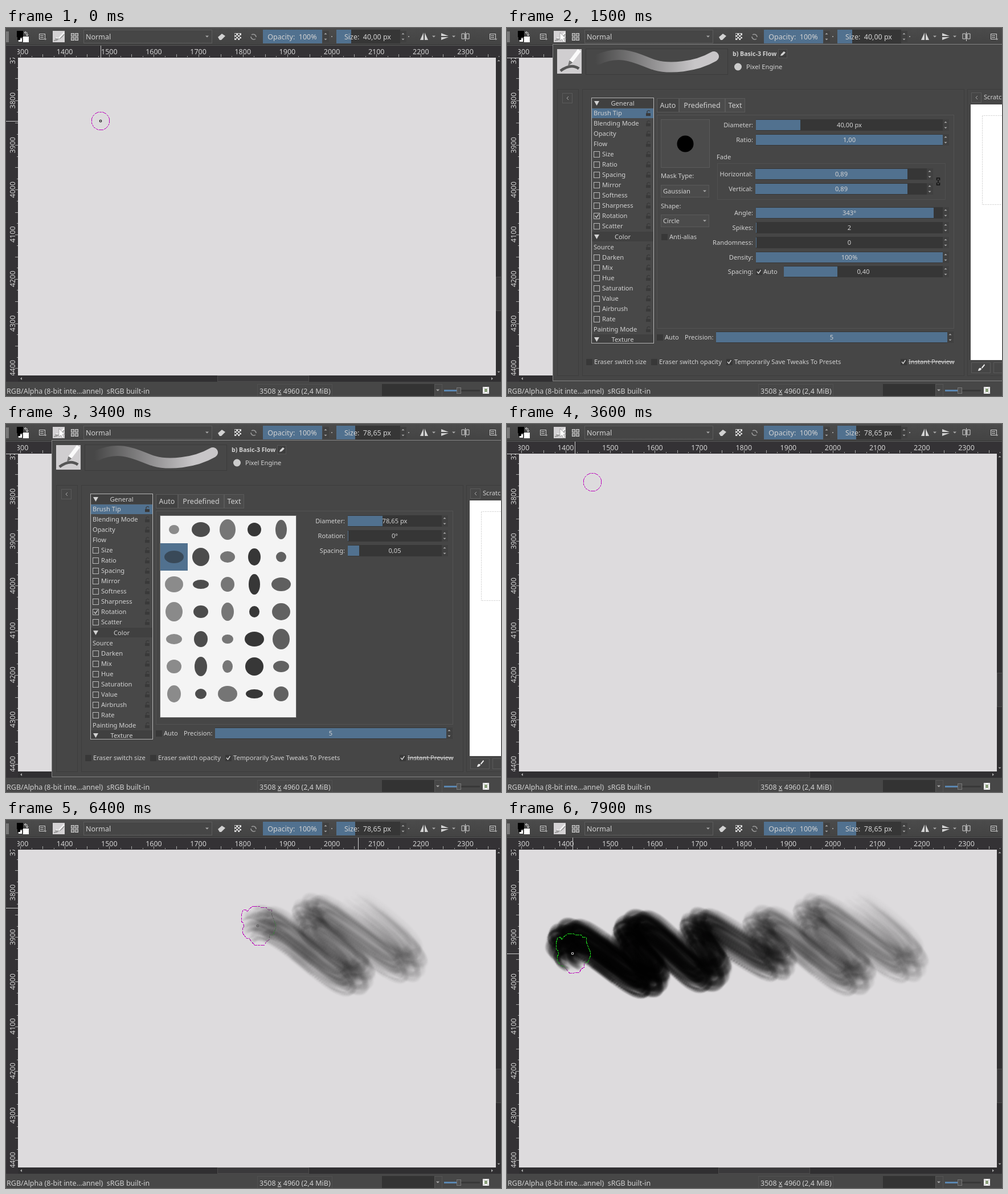
An HTML page with a canvas for the animation above (8 s loop, 869 by 645 pixels).

```html
<!DOCTYPE html>
<html lang="en">
<head>
<meta charset="utf-8">
<title>Brush tip demo</title>
<style>
html, body { margin: 0; width: 100%; height: 100%; overflow: hidden; background: #464646; }
#stage { position: relative; width: 869px; height: 645px; overflow: hidden; isolation: isolate; }
#stage > * { position: absolute; left: 0; top: 0; }
text { font-family: "Noto Sans", "Open Sans", sans-serif; white-space: pre; }
#ring { mix-blend-mode: difference; }
</style>
</head>
<body>
<div id="stage">
  <svg id="ui" width="869" height="645"></svg>
  <canvas id="paint" width="869" height="645"></canvas>
  <svg id="ring" width="869" height="645" fill="none">
    <g id="outline">
      <circle id="round" r="15.8" stroke="#22dd22" stroke-dasharray="4 .8" shape-rendering="crispEdges"/>
      <path id="blob" stroke="#22dd22" stroke-dasharray="7 1 4 1.5" shape-rendering="crispEdges" transform="translate(-2 -1.500)"
        d="M-6-33L4-33 7-31 17-31 20-27 26-27 27-17 30-9 33-2 33 7 29 17 22 18 22 26 17 29 14 35-3 36-9 29-13 24-18 23-25 14-25 6-22 3-24-4-27-6-27-17-24-26-19-27-17-23-12-29z"/>
      <circle id="dot" r="1.8" stroke="#dddbdd" stroke-width="1.1"/>
    </g>
  </svg>
  <svg id="top" width="869" height="645">
    <path id="pointer" d="M0 0V14.500L3.500 11.500 6 17 8.600 15.800 6.200 10.500H10.500z" fill="#fff" stroke="#8a8a8a" stroke-width=".7"/>
  </svg>
</div>
<script>
const $ = id => document.getElementById(id);
const BLUE = '#51718f', DARK = '#363636', INK = '#d2d2d2', BIG = 12.5, SMALL = 11.15;

// Markup helpers
const rect = (x, y, w, h, fill, more = '') => `<rect x="${x}" y="${y}" width="${w}" height="${h}" fill="${fill}" ${more}/>`;
const box = (x, y, w, h, line = '#555', fill = 'none') => rect(x + .5, y + .5, w - 1, h - 1, fill, `stroke="${line}"`);
const path = (d, fill = INK, line = 'none', w = 1) => `<path d="${d}" fill="${fill}" stroke="${line}" stroke-width="${w}"/>`;
const text = (x, y, s, size = SMALL, anchor = 'start', more = '') =>
  `<text x="${x}" y="${Math.round(y + size * .36)}" font-size="${size}" text-anchor="${anchor}" fill="${INK}" ${more}>${s}</text>`;
const down = (x, y, r = 3) => path(`M${x - r} ${y - r / 2}h${2 * r}l${-r} ${r}z`, '#aaa');
const up = (x, y, r = 3) => path(`M${x - r} ${y + r / 2}h${2 * r}l${-r} ${-r}z`, '#aaa');
const spin = (x, y) => rect(x - 5, y - 10, 11, 20, '#404040') + up(x, y - 5, 2.5) + down(x, y + 5, 2.5);
const check = (x, y, on) => rect(x - 5, y - 5, 11, 11, '#383838') +
  (on ? path(`M${x - 3} ${y}l2.500 3 4-6`, 'none', INK, 1.4) : '');
const combo = (x, y, w, s) => box(x, y - 11, w, 22, '#5a5a5a', '#4b4b4b') + text(x + 4, y, s) + down(x + w - 8, y);
const slider = (x, y, end, fillEnd, s, spinX) => rect(x, y - 10, end - x, 20, DARK) +
  rect(x, y - 9, Math.max(1, fillEnd - x), 18, BLUE) + text((x + end) / 2, y, s, SMALL, 'middle') + spin(spinX, y);
const row = (label, y, fillEnd, s) => text(432, y, label, SMALL, 'end') + slider(437, y, 765, fillEnd, s, 770);

function windowIcon(x, y) {
  return box(x - 6, y - 5, 11, 10, INK) + rect(x - 4, y - 2, 6, 1, INK) + rect(x - 4, y + 1, 6, 1, INK) + down(x + 5, y + 5, 2.5);
}

function toolbar() {
  let s = rect(0, 0, 869, 30, 'url(#bar)') + rect(0, 29, 869, 1, '#333') + rect(0, 30, 869, 1, '#5b5b5b') + rect(0, 6, 5, 19, '#777');
  s += rect(30, 15, 10, 10, '#fff') + rect(19, 5, 11, 11, '#000') + rect(22, 18, 6, 6, '#fff') + rect(20, 16, 5, 5, '#000');
  s += path('M33 8h4v5M35 6l-3 2 3 2M35 11l2 3 2-3', 'none', INK);
  s += windowIcon(64, 15) + rect(82, 5, 21, 20, '#d4d2d4');
  s += path('M84 22Q95 21 102 11', 'none', '#8f8f8f', 1.5) + path('M88 17l4 2 10-11', 'none', '#f4f4f4', 2.5) + path('M86 19h7', 'none', '#777');
  for (const x of [115, 122]) for (const y of [9, 16]) s += box(x - 1, y, 6, 6, INK, '#777');
  s += box(136, 3, 226, 24, '#5c5c5c', '#464646') + text(140, 15, 'Normal', BIG) + down(353, 15);
  s += path('M372 16l7-6 6 4-7 7h-3z') + rect(401, 9, 12, 12, INK);
  for (let i = 0; i < 8; i++) s += rect(402 + i % 4 * 3 - .5, 10 + (i % 2) * 3 + (i > 3) * 5.500, 2.500, 2.500, '#333');
  s += path('M431 12a5 5 0 0 1 8 4M438 19a5 5 0 0 1-8-4', 'none', '#999', 1.5);
  s += rect(451, 3, 104, 24, BLUE) + text(502.5, 15, 'Opacity:  100%', BIG, 'middle') + spin(561, 15) + rect(571, 14, 2, 2, '#999');
  s += rect(580, 3, 112, 24, DARK) + `<rect id="sizeFill" x="580" y="3" height="24" fill="${BLUE}"/>`;
  s += text(594, 15, 'Size:', BIG) + text(676, 15, '', BIG, 'end', 'id="sizeText"') + spin(697, 15) + rect(706, 14, 2, 2, '#999');
  s += path('M733 8v13h-6zM735 8v13h6z') + down(751, 15) + path('M764 9v5h13zM764 21v-5h13z') + down(786, 15);
  s += path('M800 10h5v9h-5zM808 10h5v9h-5zM806.500 7v16', 'none', INK) + windowIcon(855, 15);
  return s;
}

function thumb(x, y, n) {
  return `<svg x="${x}" y="${y}" width="${n}" height="${n}" viewBox="0 0 44 44">` + rect(0, 0, 44, 44, '#d0ced0') +
    path('M6 39Q25 25 39 35', 'none', '#555', 5) + path('M40 2L24 23', 'none', '#fafafa', 7) +
    path('M22 20l6 4-9 7z', '#777') + '</svg>';
}

function rulers() {
  const step = 78.15;
  let s = rect(0, 31, 869, 21, '#343235') + rect(0, 52, 21, 568, '#343235');
  let h = '', v = '';
  for (let i = 0; i < 45; i++) {
    const x = Math.round(25 + i * step / 4), y = Math.round(49 + i * step / 4);
    const len = i % 4 == 0 ? 5 : i % 2 ? 2 : 5;
    if (x > 21) h += rect(x, 51 - len, 1, len, '#aaa');
    if (y > 52 && y < 609) v += rect(21 - len, y, len, 1, '#aaa');
    if (i % 4) continue;
    h += text(25 + i / 4 * step, 41, 1300 + 25 * i, BIG, 'middle');
    if (i < 32) v += text(0, 0, 3700 + 25 * i, BIG, 'middle', `transform="translate(11 ${49 + i / 4 * step}) rotate(-90)"`);
  }
  return s + `<g clip-path="url(#hclip)">${h}</g><g clip-path="url(#vclip)">${v}</g>` +
    rect(0, 31, 1, 21, '#ccc', 'id="markX"') + rect(0, 0, 21, 1, '#ccc', 'id="markY"');
}

function frame() {
  let s = rect(21, 52, 839, 557, '#dddbdd');
  s += rect(860, 52, 9, 568, '#302f31') + box(860, 436, 10, 60, '#4c4c4c', '#3a393b') + up(865, 57, 2.5) + down(865, 603, 2.5);
  s += rect(21, 609, 839, 11, '#302f31') + box(371, 609, 161, 11, '#4c4c4c', '#3a393b');
  s += path('M28 612v5l-3-2.500zM852 612v5l3-2.500z', '#aaa');
  s += rect(0, 620, 869, 25, '#474747') + text(1, 636, 'RGB/Alpha (8-bit inte...annel)  sRGB built-in', BIG);
  s += box(441, 624, 132, 22, '#505050') + text(445, 636, '3508 <tspan text-decoration="underline">x</tspan> 4960 (2,4 MiB)', BIG);
  s += rect(660, 624, 92, 21, '#333') + box(752, 624, 14, 22, '#555') + down(758, 635);
  s += rect(769, 634, 25, 3, '#5b86b0') + rect(799, 634, 33, 3, '#383838') + box(791, 630, 8, 11, '#777', '#505050');
  s += rect(837, 629, 11, 12, '#f2f2f2') + rect(840, 632, 5, 6, '#8aa07a') + path('M838 630l3 3M847 630l-3 3M838 640l3-3M847 640l-3-3', 'none', '#aaa');
  return s;
}

const OPTIONS = '#General,Brush Tip,Blending Mode,Opacity,Flow,+Size,+Ratio,+Spacing,+Mirror,+Softness,+Sharpness,!Rotation,+Scatter,#Color,Source,+Darken,+Mix,+Hue,+Saturation,+Value,+Airbrush,+Rate,Painting Mode,#Texture';

function optionList() {
  let s = rect(149, 123, 108, 429, '#484848') + rect(149, 141, 108, 17, BLUE);
  OPTIONS.split(',').forEach((name, i) => {
    const y = 132 + i * 18 - (i > 0 && i < 13 ? .8 : 0), kind = name[0], label = name.slice(1);
    if (kind == '#') {
      s += rect(149, y - 9, 108, 17, '#404040') + path(`M153 ${y - 4}h9l-4.500 8z`) + text(203, y, label, SMALL, 'middle');
      return;
    }
    const boxed = kind == '+' || kind == '!';
    if (boxed) s += box(152, Math.round(y) - 5, 11, 11, '#bbb');
    if (kind == '!') s += path(`M154.500 ${y}l2.500 3 4-6`, 'none', INK, 1.2);
    s += text(boxed ? 167 : 152, y, boxed ? label : name);
    s += rect(244, y, 8, 5, '#393939') + path(`M246 ${y}v-3q3-3 5 0`, 'none', '#393939', 1.3);
  });
  return s + box(148, 122, 110, 431, '#b5b5b5');
}

function autoPane() {
  let s = box(270, 160, 86, 85, '#5a5a5a', '#4b4b4b') + '<circle cx="313" cy="203" r="14.5"/>';
  s += text(270, 259, 'Mask Type:') + combo(270, 286, 85, 'Gaussian') + text(270, 312, 'Shape:') + combo(270, 338, 85, 'Circle');
  s += check(276, 366) + text(285, 366, 'Anti-alias');
  s += row('Diameter:', 170, 515, '40,00 px') + row('Ratio:', 196, 765, '1,00') + text(368, 226, 'Fade');
  s += box(369, 237, 401, 64, '#505050');
  [['Horizontal:', 256], ['Vertical:', 282]].forEach(([label, y]) => {
    s += text(431, y, label, SMALL, 'end') + slider(436, y, 738, 703, '0,89', 742);
  });
  s += path('M754.500 267v-4h5v4M754.500 271v4h5v-4M757 266v6', 'none', '#111', 1.5);
  s += row('Angle:', 324, 749, '343°') + row('Spikes:', 350, 437, '2') + row('Randomness:', 376, 437, '0') + row('Density:', 402, 765, '100%');
  return s + text(432, 427, 'Spacing:', SMALL, 'end') + check(442, 427, true) + text(450, 427, 'Auto') + slider(486, 427, 765, 580, '0,40', 770);
}

function tipPane() {
  let s = box(270, 160, 240, 355, '#666', '#f4f4f4') + rect(271, 209, 48, 48, BLUE);
  for (let i = 0; i < 35; i++) {
    const x = 295 + i % 5 * 47, y = 185 + Math.floor(i / 5) * 48;
    s += `<ellipse cx="${x}" cy="${y}" rx="${9 + i * 7 % 9}" ry="${8 + i * 5 % 11}" fill="#222" opacity="${.5 + i * 3 % 5 / 10}"/>`;
  }
  [['Diameter:', 661, '78,65 px'], ['Rotation:', 600, '0°'], ['Spacing:', 620, '0,05']].forEach(([label, end, value], i) => {
    s += text(595, 170 + i * 26, label, SMALL, 'end') + slider(600, 170 + i * 26, 765, end, value, 770);
  });
  return s;
}

function panel() {
  let s = rect(80, 28, 789, 592, '#464646') + path('M869 28.500H80.500V618.500H869', 'none', '#858585');
  s += thumb(88, 37, 43) + box(138, 36, 250, 46, '#3b3b3b', '#474747');
  s += path('M160 55C205 35 235 58 260 65S330 69 363 50', 'none', 'url(#fade)', 18).replace('/>', ' stroke-linecap="round"/>');
  s += text(396, 45, 'b) Basic-3 Flow', 10.6, 'start', 'font-weight="700"') + box(476, 37, 16, 16, '#555', '#3e3e3e');
  s += path('M480 49l1-3 5-5 3 2-5 5z') + '<circle cx="405.5" cy="68" r="6.500" fill="#ccc"/>' + text(420, 68, 'Pixel Engine');
  s += box(88, 107, 38, 503, '#3d3d3d') + box(132, 107, 671, 503, '#3d3d3d') + box(808, 107, 80, 503, '#3d3d3d');
  for (const x of [97, 815]) {
    const y = x < 100 ? 114 : 113;
    s += box(x, y, 18, 18, '#5a5a5a') + path(`M${x + 11} ${y + 6}l-3 3 3 3`, 'none', '#aaa');
  }
  s += text(837, 121, 'Scratchpad') + rect(814, 134, 55, 448, '#fff');
  s += '<path d="M869 153.500H834.500V309.500H869" fill="none" stroke="#aaa" stroke-dasharray="1 2"/>';
  s += box(815, 586, 34, 19, '#5a5a5a') + path('M827 601q1-6 5-5l1 2q-2 3-6 3zM833 595l5-6 1 2-5 6z', '#eee') + box(854, 586, 30, 19, '#5a5a5a');
  s += optionList() + box(263, 152, 522, 375, '#535353');
  [['Auto', 263, 39], ['Predefined', 302, 81], ['Text', 383, 35]].forEach(([label, x, w], i) => {
    s += box(x, 123, w, 25, '#5a5a5a', i ? '#4b4b4b' : '#424242') + text(x + w / 2, 135, label, BIG, 'middle');
  });
  s += `<g id="autoPane">${autoPane()}</g><g id="tipPane">${tipPane()}</g>`;
  s += check(268, 542) + text(277, 542, 'Auto') + text(312, 542, 'Precision:') + slider(367, 542, 773, 773, '5', 778);
  s += check(144, 585) + text(153, 585, 'Eraser switch size') + check(258, 585) + text(267, 585, 'Eraser switch opacity');
  s += check(390, 585, true) + text(399, 585, 'Temporarily Save Tweaks To Presets') + check(696, 585, true);
  return s + text(705, 585, 'Instant Preview', SMALL, 'start', 'text-decoration="line-through"');
}

$('ui').innerHTML = `<defs>
  <linearGradient id="bar" x2="0" y2="1"><stop stop-color="#4b4b4b"/><stop offset="1" stop-color="#434343"/></linearGradient>
  <linearGradient id="fade" gradientUnits="userSpaceOnUse" x1="155" x2="330"><stop stop-color="#c8c6c8" stop-opacity="0"/><stop offset="1" stop-color="#c8c6c8"/></linearGradient>
  <clipPath id="hclip"><rect x="20" y="31" width="849" height="21"/></clipPath>
  <clipPath id="vclip"><rect y="52" width="21" height="557"/></clipPath></defs>` +
  frame() + rulers() + toolbar() + `<g id="panel">${panel()}</g>`;

// Cursor path: time, x, y; the stroke also has a flow value per corner
const MOVES = [[0, 166, 163], [300, 163, 150], [700, 150, 102], [900, 93, 8], [1500, 93, 8], [1900, 212, 66], [2400, 333, 136],
  [2700, 333, 136], [2900, 300, 230], [3000, 300, 230], [3300, 93, 8], [3600, 93, 8], [3900, 150, 75], [4500, 570, 160],
  [4900, 680, 201], [5100, 660, 183], [5400, 618, 154]];
const STROKE = [[5400, 618, 154, .01], [5600, 710, 252, .06], [5850, 531, 163, .08], [6080, 618, 273, .08], [6400, 442, 185.5, .1],
  [6550, 479, 250, .13], [6720, 333, 187, .28], [6900, 363, 264, .3], [7300, 216, 196, .45], [7480, 255, 277, .45],
  [7750, 102, 208, .5], [7900, 115, 234, .25]];
const START = 5400, END = 7900, LOOP = 8000;
// The hand rounds every corner of the stroke heading down and left, in px per ms
const SWING = { x: -.25, y: .32 };

function at(t) {
  t = Math.min(t, END);
  const drawn = t >= START, keys = drawn ? STROKE : MOVES;
  const i = Math.max(1, keys.findIndex(k => k[0] >= t)), a = keys[i - 1], b = keys[i];
  const span = b[0] - a[0], u = (t - a[0]) / span;
  const mix = (n, e) => a[n] + (b[n] - a[n]) * e;
  if (!drawn) return { x: mix(1, u), y: mix(2, u) };
  const e = u * u * (3 - 2 * u);
  const leave = i > 1 ? u * (1 - u) ** 2 : 0, arrive = i < keys.length - 1 ? u * u * (u - 1) : 0;
  const swing = span * (leave + arrive);
  return { x: mix(1, e) + SWING.x * swing, y: mix(2, e) + SWING.y * swing, flow: mix(3, u) };
}

// Bristly brush tip
let seed = 11;
const random = () => (seed = seed * 16807 % 2147483647) / 2147483647;
const tip = document.createElement('canvas');
tip.width = tip.height = 80;
const tipCtx = tip.getContext('2d');
function soft(x, y, r, alpha) {
  const g = tipCtx.createRadialGradient(x, y, 0, x, y, r);
  g.addColorStop(0, `rgba(0,0,0,${alpha})`);
  g.addColorStop(.5, `rgba(0,0,0,${alpha * .7})`);
  g.addColorStop(1, 'rgba(0,0,0,0)');
  tipCtx.fillStyle = g;
  tipCtx.fillRect(x - r, y - r, 2 * r, 2 * r);
}
soft(40, 40, 33, .5);
for (let i = 0; i < 55; i++) {
  const a = random() * 2 * Math.PI, d = Math.sqrt(random());
  soft(40 + Math.cos(a) * d * 28, 40 + Math.sin(a) * d * 31, 3 + random() * 4.5, .3 + random() * .65);
}

const dabs = [];
for (let t = START, last = { x: 0, y: 0 }; t <= END; t += 2) {
  const p = at(t);
  if (Math.hypot(p.x - last.x, p.y - last.y) < 3.5) continue;
  dabs.push({ t, ...p });
  last = p;
}

const ctx = $('paint').getContext('2d');
const show = (id, on) => $(id).style.display = on ? '' : 'none';
const move = (id, p) => $(id).setAttribute('transform', `translate(${p.x} ${p.y})`);

function mark(t) {
  if (t < 800) return at(t);
  if (t < 3900) return { x: 119, y: 52 };
  if (t < START) return at(t - 80);
  return at(t < 7300 ? START : t);
}

function draw(t) {
  const open = t >= 1500 && t < 3500, away = t >= 700 && t < 3900, resized = t >= 2700;
  show('panel', open);
  show('autoPane', !resized);
  show('tipPane', resized);
  show('ring', !open);
  show('round', t < 3900);
  show('blob', t >= 3900);
  show('dot', !away);
  show('pointer', t >= 800 && t < 3900);
  move('outline', at(away ? 700 : t));
  move('pointer', at(t));
  const m = mark(t);
  $('markX').setAttribute('x', Math.round(m.x));
  $('markY').setAttribute('y', Math.max(52, Math.round(m.y)));
  $('sizeFill').setAttribute('width', resized ? 33 : 26);
  $('sizeText').textContent = resized ? '78,65 px' : '40,00 px';
  ctx.clearRect(0, 0, 869, 645);
  for (const d of dabs) {
    if (d.t > t) break;
    ctx.globalAlpha = d.flow;
    ctx.drawImage(tip, d.x - 40, d.y - 40);
  }
}

const begin = performance.now();
let shown = -1;
function tick() {
  const t = Math.floor((performance.now() - begin) % LOOP / 100) * 100;
  if (t != shown) draw(shown = t);
  requestAnimationFrame(tick);
}
tick();
</script>
</body>
</html>
```
